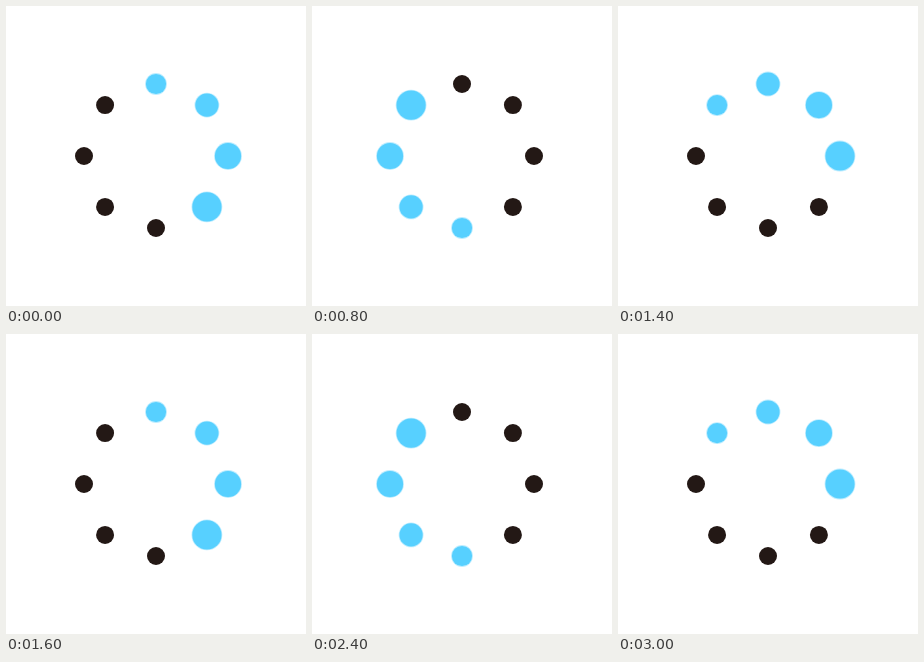
These frames come from a looping animation (300 px wide and 300 px high, 3200 ms). An HTML page with a canvas:

```html
<!DOCTYPE html>
<html>
<head>
<meta charset="utf-8">
<title>Loading</title>
<style>
  html, body { margin: 0; width: 100%; height: 100%; overflow: hidden; background: #fff; }
  canvas { display: block; }
</style>
</head>
<body>
<canvas id="stage" width="300" height="300"></canvas>
<script>
const ctx = document.getElementById('stage').getContext('2d');
const COUNT = 8, STEP = 200, RING = 72, TAIL = 4;
const start = performance.now();

function disc(x, y, r, color, alpha = 1) {
  ctx.globalAlpha = alpha;
  ctx.fillStyle = color;
  ctx.beginPath();
  ctx.arc(x, y, r, 0, 2 * Math.PI);
  ctx.fill();
}

function draw(now) {
  const step = Math.floor(Math.max(0, now - start) / STEP);
  const head = (step + 1) % COUNT;
  ctx.clearRect(0, 0, 300, 300);
  for (let i = 0; i < COUNT; i++) {
    const angle = i * 2 * Math.PI / COUNT;
    const x = 150 + RING * Math.cos(angle);
    const y = 150 + RING * Math.sin(angle);
    const lag = (head - i + COUNT) % COUNT;
    if (lag < TAIL) {
      const r = 15 - 1.5 * lag;
      disc(x, y, r + 0.4, '#57d0ff', 0.4); // soft rim
      disc(x, y, r - 0.4, '#57d0ff');
    } else {
      disc(x, y, 9, '#231815');
    }
  }
  requestAnimationFrame(draw);
}
draw(start);
</script>
</body>
</html>
```
